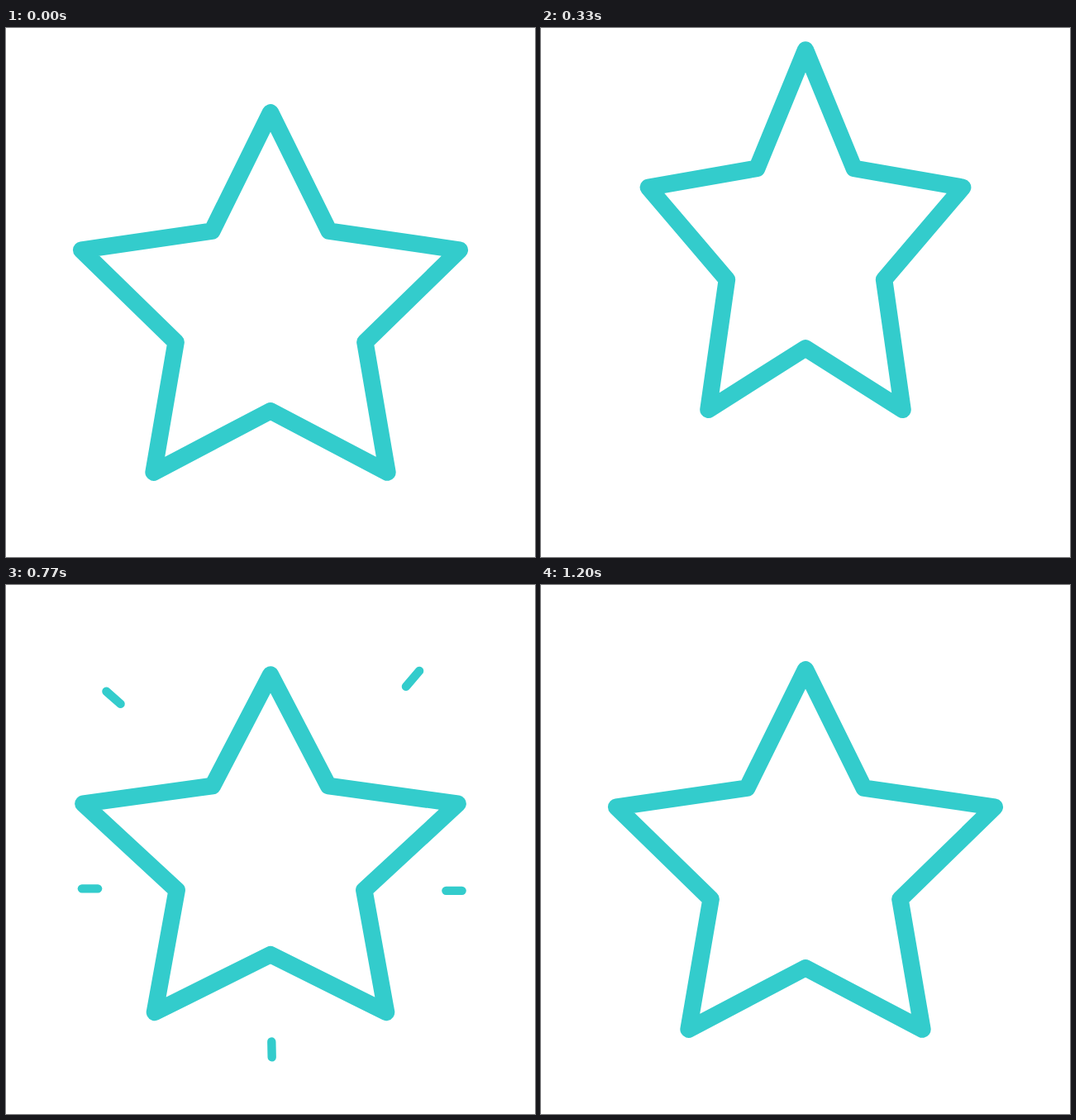
An HTML page that plays this animation: 640x640 px, repeating every 1.57 s.

```html
<!DOCTYPE html>
<html lang="en">
<head>
<meta charset="utf-8">
<title>Bouncing star</title>
<style>
  html, body { margin: 0; height: 100%; overflow: hidden; background: #fff; }
  svg { display: block; width: 100vw; height: 100vh; }
  path { fill: #fff; stroke: #3cc; stroke-linecap: round; stroke-linejoin: round; }
</style>
</head>
<body>
<svg viewBox="0 0 640 640">
  <g id="rays"></g>
  <path id="star"/>
</svg>
<script>
const LOOP = 1570, STROKE = 20.5;
const CENTER = 320, GROUND = 537.6, RADIUS = 240.6;
const SHOW = 11, LAND = 18, GONE = 26;

// Poses stretch the star from its feet and lift it off the ground.
const rest = { wide: 1, tall: 1, lift: 0 };
const leap = { wide: 0.831, tall: 1, lift: 75.8 };
const squash = { wide: 1.093, tall: 0.879, lift: 0.4 };
const hop = { wide: 0.862, tall: 1.012, lift: 46 };
const TIMELINE = [[0, rest], [10, leap], [SHOW, leap], [LAND, squash], [19, squash], [28, hop], [36, rest]];

// Middle of each ray on landing, and the vector to its outer end.
const RAYS = [
  { x: 130, y: 157, dx: -17, dy: -15 },
  { x: 492, y: 134, dx: 16, dy: -18.7 },
  { x: 542, y: 390.5, dx: 19, dy: 0 },
  { x: 321.5, y: 582.5, dx: 0.4, dy: 18.7 },
  { x: 101.5, y: 388, dx: -19, dy: 0 }
];

const star = document.getElementById('star');
const group = document.getElementById('rays');
star.style.strokeWidth = STROKE;
for (const ray of RAYS) {
  ray.path = group.appendChild(document.createElementNS('http://www.w3.org/2000/svg', 'path'));
}

function poseAt(step) {
  const i = Math.max(1, TIMELINE.findIndex(([end]) => end >= step));
  const [start, from] = TIMELINE[i - 1], [end, to] = TIMELINE[i];
  const mix = key => from[key] + (to[key] - from[key]) * (step - start) / (end - start);
  return { wide: mix('wide'), tall: mix('tall'), lift: mix('lift') };
}

function drawStar({ wide, tall, lift }) {
  const foot = RADIUS * Math.cos(Math.PI / 5);
  const points = Array.from({ length: 10 }, (_, i) => {
    const angle = i * Math.PI / 5, r = i % 2 ? RADIUS / 2 : RADIUS;
    return [
      CENTER + r * Math.sin(angle) * wide,
      GROUND - lift - (foot + r * Math.cos(angle)) * tall
    ];
  });
  star.setAttribute('d', 'M' + points.join('L') + 'Z');
}

// Rays fall with the star, fly out half a length per step, then shrink.
function drawRays(step, lift) {
  group.style.display = step > SHOW && step < GONE ? '' : 'none';
  const travel = Math.min(0, step - LAND);
  const size = 1 - Math.min(1, Math.max(0, (step - LAND) / (GONE - LAND)) ** 1.5);
  for (const { x, y, dx, dy, path } of RAYS) {
    const end = side => [x + dx * (travel + side * size), y - lift + dy * (travel + side * size)];
    path.setAttribute('d', `M${end(-1)}L${end(1)}`);
    path.style.strokeWidth = STROKE * size;
  }
}

function frame() {
  // Thirty steps a second on a 10 ms grid, then a rest.
  const ticks = Math.floor(performance.now() % LOOP / 10);
  const step = Math.min(36, Math.floor(ticks * 0.3 + 0.11));
  const pose = poseAt(step);
  drawStar(pose);
  drawRays(step, pose.lift);
  requestAnimationFrame(frame);
}
frame();
</script>
</body>
</html>
```
